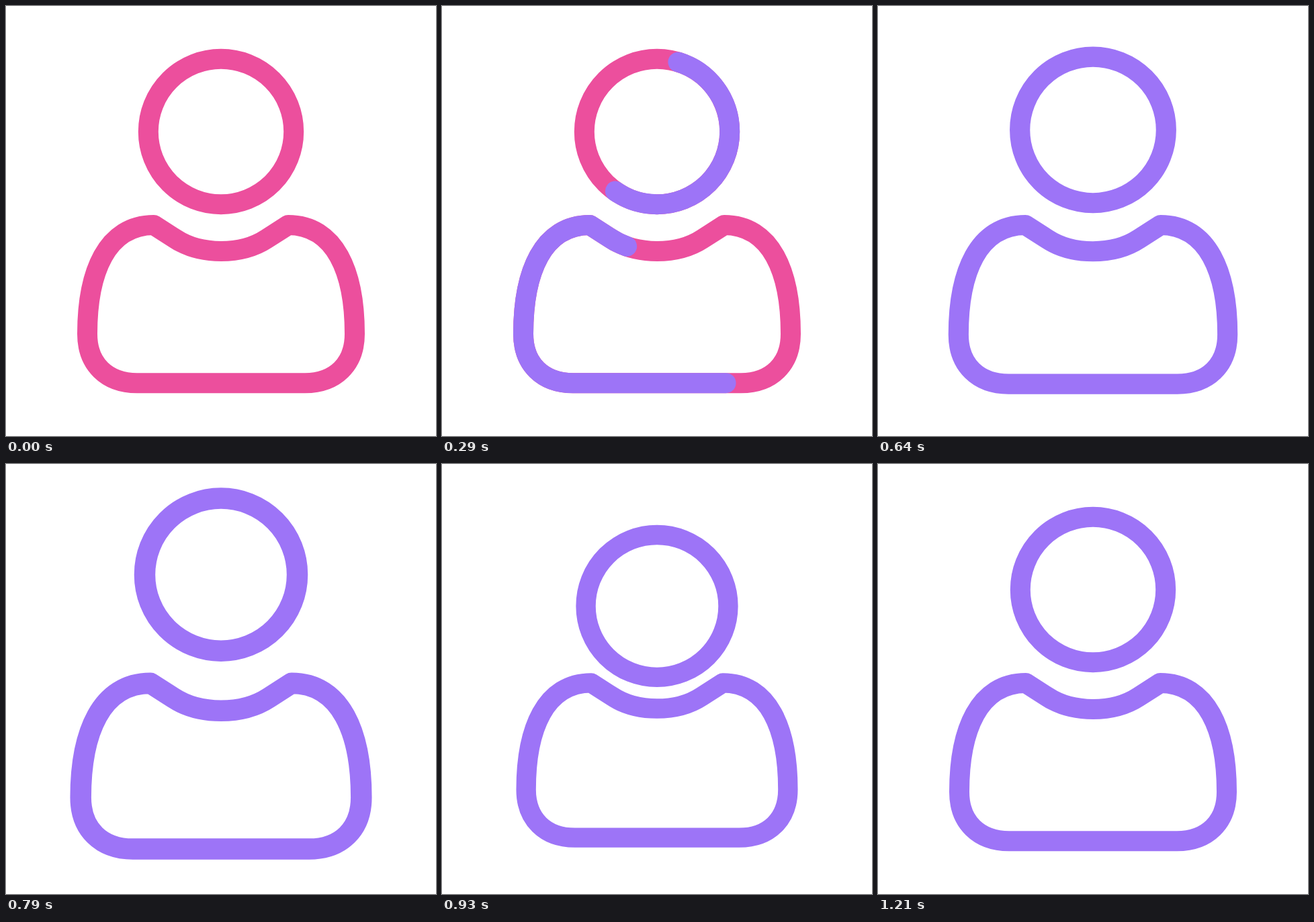
An HTML page that plays this animation: 640 by 640 pixels, repeating every 2000 ms.

```html
<!DOCTYPE html>
<html lang="en">
<head>
<meta charset="utf-8">
<title>User icon</title>
<style>
  html, body { margin: 0; width: 100%; height: 100%; overflow: hidden; background: #fff; }
  svg { display: block; width: 100%; height: 100%; }
  .line { fill: none; stroke-width: 30; stroke-linecap: round; stroke-linejoin: round; }
  .base { stroke: #ec4f9d; }
  .ink { stroke: #9d74f7; }
</style>
</head>
<body>
<svg viewBox="0 0 640 640">
  <g id="icon">
    <g id="head"></g>
    <g id="body"></g>
  </g>
</svg>
<script>
const LOOP = 2000, FPS = 14;
const DRAW = 519;      // ms until the new colour covers the outline
const DRIFT = 0.28;    // how far the tail creeps along meanwhile

const $ = id => document.getElementById(id);

function addLine(parent, kind, d) {
  const path = document.createElementNS('http://www.w3.org/2000/svg', 'path');
  path.setAttribute('class', 'line ' + kind);
  path.setAttribute('d', d);
  path.setAttribute('pathLength', 1);
  parent.append(path);
  return path;
}

function makePart(id, d, start) {
  const group = $(id);
  return { group, start, base: addLine(group, 'base', d), ink: addLine(group, 'ink', d) };
}

// Both outlines begin at their lowest middle point
const head = makePart('head',
  'M320 295.2a108.2 108.2 0 0 0 0-216.4a108.2 108.2 0 0 0 0 216.4Z', -0.2515);
const body = makePart('body',
  'M320 561.2H195C150 561.2 121 533 121 488C121 396 150 326 220 326' +
  'L252 346.5C271 359 296 365 320 365C344 365 369 359 388 346.5' +
  'L420 326C490 326 519 396 519 488C519 533 490 561.2 445 561.2Z', -0.245);

const ease = x => x * x * (3 - 2 * x);

// Eased value between [time, value] keys
function track(keys, t) {
  if (t <= keys[0][0]) return keys[0][1];
  for (let i = 1; i < keys.length; i++) {
    const [t0, a] = keys[i - 1], [t1, b] = keys[i];
    if (t < t1) return a + (b - a) * ease((t - t0) / (t1 - t0));
  }
  return keys[keys.length - 1][1];
}

const SCALE = [[600, 1], [800, 1.05], [1000, 0.95], [1200, 1]];
const NOD = [[600, 0], [800, -15.3], [1000, 37.5], [1200, 0]];

function trim({ base, ink, start }, p) {
  const done = p >= 1;
  base.style.display = done ? 'none' : '';
  ink.style.display = p > 0 ? '' : 'none';
  ink.style.strokeDasharray = done ? 'none' : `${p} ${1 - p}`;
  // Kept positive: a whole turn added to the shift
  ink.style.strokeDashoffset = done ? 0 : 1 - (start + DRIFT * p);
}

function render(t) {
  const p = Math.min(t / DRAW, 1);
  trim(head, p);
  trim(body, p);
  const s = track(SCALE, t);
  $('icon').setAttribute('transform', `translate(320 320) scale(${s}) translate(-320 -320)`);
  head.group.setAttribute('transform', `translate(0 ${track(NOD, t)})`);
}

function tick() {
  const t = performance.now() % LOOP;
  // Held poses, with the step times rounded to 10 ms
  const step = Math.min(Math.floor((t + 6) * FPS / 1000), LOOP * FPS / 1000 - 1);
  render(step * 1000 / FPS);
  requestAnimationFrame(tick);
}
render(0);
requestAnimationFrame(tick);
</script>
</body>
</html>
```
